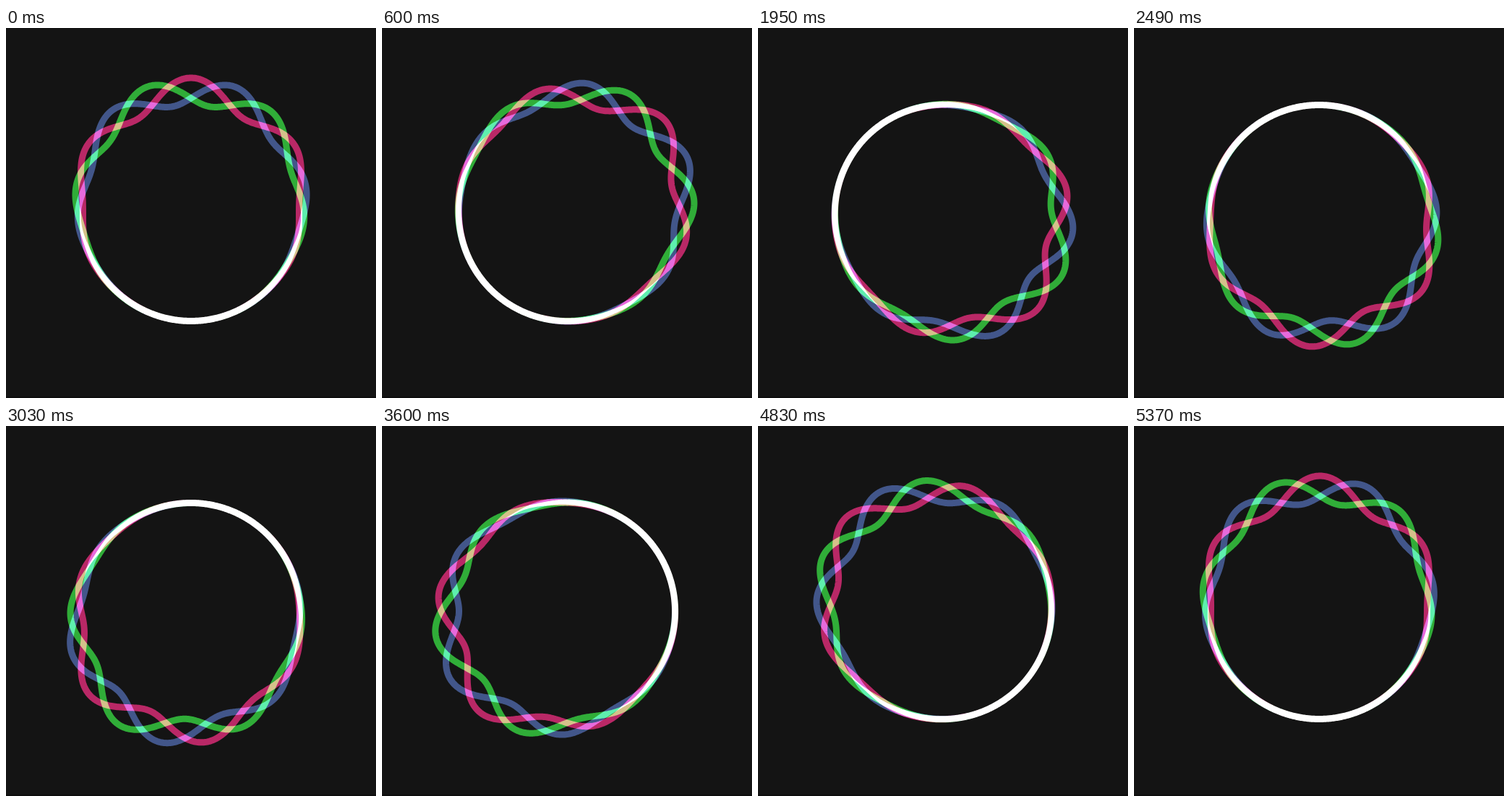
An HTML page with a canvas that plays this animation: 512x512 px, repeating every 5.4 s.

```html
<!DOCTYPE html>
<html lang="en">
<head>
<meta charset="utf-8">
<title>Braided ring</title>
<style>
  html, body { margin: 0; width: 100%; height: 100%; overflow: hidden; background: #141414; }
  canvas { display: block; width: 512px; height: 512px; }
</style>
</head>
<body>
<canvas id="stage" width="512" height="512"></canvas>
<script>
  const ctx = document.getElementById('stage').getContext('2d');
  const TAU = Math.PI * 2;
  const LOOP = 5400, STEP = 30;
  const CENTER = 256, RADIUS = 149.5, SWELL = 37.5, WAVES = 6, POINTS = 720;
  // The three colours add up to white over the background.
  const STRANDS = ['rgb(165,20,82)', 'rgb(46,66,118)', 'rgb(28,153,36)'];

  function strand(index, progress) {
    const crest = progress * TAU;       // the swell turns once clockwise
    const drift = -progress * TAU / 3;  // the waves slide back two periods
    ctx.beginPath();
    for (let i = 0; i < POINTS; i++) {
      const angle = i / POINTS * TAU;
      const swell = SWELL * Math.cos((angle - crest) / 2) ** 4;
      const wave = (1 + Math.cos(WAVES * (angle - drift) - index * TAU / 3)) / 2;
      const r = RADIUS + swell * wave;
      ctx.lineTo(CENTER + r * Math.sin(angle), CENTER - r * Math.cos(angle));
    }
    ctx.closePath();
    ctx.strokeStyle = STRANDS[index];
    ctx.stroke();
  }

  function draw() {
    const time = performance.now() % LOOP;
    const progress = Math.floor(time / STEP) * STEP / LOOP;
    ctx.globalCompositeOperation = 'source-over';
    ctx.fillStyle = '#141414';
    ctx.fillRect(0, 0, 512, 512);
    ctx.fillStyle = '#0e0e0e';
    ctx.fillRect(0, 510, 512, 2);
    ctx.globalCompositeOperation = 'lighter';
    ctx.lineWidth = 9;
    ctx.lineJoin = 'round';
    STRANDS.forEach((_, i) => strand(i, progress));
    requestAnimationFrame(draw);
  }
  draw();
</script>
</body>
</html>
```
